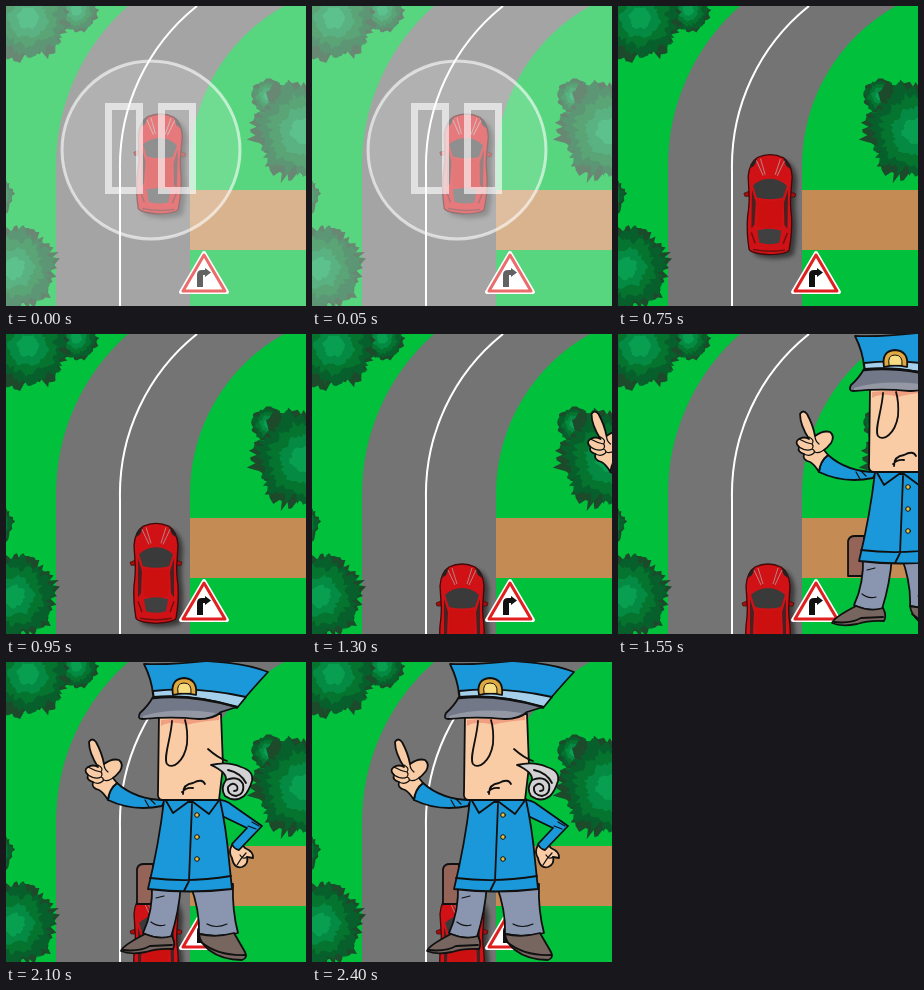
An HTML page for the animation above (2.45 s loop, 300 px wide and 300 px high).

```html
<!DOCTYPE html>
<html lang="en">
<head>
<meta charset="utf-8">
<title>Reversing car and officer</title>
<style>
  html, body { margin: 0; width: 100%; height: 100%; overflow: hidden; background: #00c03c; }
  svg { display: block; width: 100vw; height: 100vh; }
  #officer { stroke: #101010; stroke-width: 1.8; stroke-linejoin: round; stroke-linecap: round; }
  .blue { fill: #1a98da; }
  .skin { fill: #f9cca6; }
  .grey { fill: #8a96b0; }
  .shoe { fill: #76665f; }
  .line { fill: none; }
  .thin { fill: none; stroke-width: 1.2; }
</style>
</head>
<body>
<svg viewBox="0 0 300 300">
  <defs>
    <filter id="soft" x="-30%" y="-30%" width="160%" height="160%"><feGaussianBlur stdDeviation="2"/></filter>
    <path id="body" d="M-13 3Q0-3 13 3Q21 8 22 22L21 38Q20 48 22 62Q23 78 20 95Q18 99 0 100Q-18 99-20 95Q-23 78-22 62Q-20 48-21 38L-22 22Q-21 8-13 3Z"/>
  </defs>

  <rect width="300" height="300" fill="#00c03c"/>
  <path d="M50 300V160A214 214 0 0 1 122 0H278A183 183 0 0 0 184 160V300Z" fill="#747474"/>
  <path d="M114 300V165A205 205 0 0 1 191 0" fill="none" stroke="#fff" stroke-width="2"/>
  <rect x="184" y="184" width="116" height="60" fill="#c48c54"/>
  <g id="trees"></g>

  <g id="car">
    <use href="#body" x="5" y="4" fill="#000" opacity=".5" filter="url(#soft)"/>
    <path d="M-21 37L-26 39L-25 42L-20 42ZM21 37L26 39L25 42L20 42Z" fill="#a80c0c" stroke="#301010" stroke-width=".7"/>
    <use href="#body" fill="#d01216" stroke="#400808" stroke-width="1.3"/>
    <path d="M-20 14Q-19 6-13 4L-16 11ZM20 14Q19 6 13 4L16 11Z" fill="#222"/>
    <path d="M-14 6L-7 21M-10 4L-5 20M14 6L7 21M10 4L5 20" fill="none" stroke="#b98080" stroke-width="1"/>
    <path d="M-17 31Q-10 24 0 24Q10 24 17 31L13 43Q0 46-13 43Z" fill="#3a3a3a"/>
    <path d="M-18 35L-14 48L-15 70L-18 74ZM18 35L14 48L15 70L18 74Z" fill="#4a2020"/>
    <path d="M-13 45Q0 48 13 45L12 72Q0 75-12 72Z" fill="#cc1010"/>
    <path d="M-12 76Q0 72 12 76L10 88Q0 91-10 88Z" fill="#404040"/>
    <path d="M-18 78L-14 89M18 78L14 89M-16 95Q0 98 16 95" fill="none" stroke="#701010" stroke-width="1.5"/>
  </g>

  <g stroke-linejoin="round">
    <path d="M198 247L221 286H175Z" fill="#fff" stroke="#fff" stroke-width="4"/>
    <path d="M198 249L219 285H177Z" fill="#fff" stroke="#e02020" stroke-width="3"/>
    <path d="M191 281V269Q191 264 196 264H199V262L205 266.500L199 271V269H197V281Z" fill="#111"/>
  </g>

  <g id="officer">
    <path d="M131 207Q132 202 138 202H147V242H131Z" fill="#946458"/>
    <path class="grey" d="M146 222H175Q173 250 165 275Q150 278 137 271Q147 250 146 222Z"/>
    <path class="grey" d="M184 222H227Q226 248 232 271Q213 276 193 272Q194 248 184 222Z"/>
    <path class="thin" d="M145 260Q151 265 159 263M201 262Q210 267 221 262M150 236L158 234"/>
    <path class="shoe" d="M139 272Q153 278 166 274Q170 282 167 287Q152 286 140 290Q124 293 115 289Q116 284 139 272Z"/>
    <path class="line" d="M117 288Q133 290 144 284L166 283"/>
    <path class="shoe" d="M193 272Q210 276 228 271L239 290Q242 296 236 298Q216 298 203 288Q194 281 193 272Z"/>
    <path class="line" d="M195 280Q212 294 239 293"/>

    <path class="skin" d="M226 183Q235 180 239 186Q248 190 247 196L241 195Q243 202 236 205Q228 207 226 196Q222 190 226 183Z"/>
    <path class="thin" d="M231 203Q235 196 240 191M234 193Q237 198 241 195"/>
    <path class="blue" d="M209 138Q219 137 226 143L256 164L233 188Q228 187 226 182L241 166L214 153Z"/>
    <path class="thin" d="M246 160L253 164M242 164L250 167"/>

    <path class="blue" d="M159 138Q130 138 111 121Q103 127 102 138Q127 150 156 144Z"/>
    <path class="thin" d="M139 138L143 145M144 137L149 142"/>
    <path class="skin" d="M102 138Q97 130 93 128Q85 126 87 120Q80 118 82 113Q77 108 82 105Q87 102 92 105Q83 91 83 80Q86 75 90 80Q96 91 98 102Q106 96 113 98Q118 102 114 109Q110 114 107 116L111 121Q103 127 102 138Z"/>
    <path class="thin" d="M82 105Q89 109 95 110Q98 106 92 103M82 113Q90 118 95 115Q97 112 95 110M87 120Q93 123 97 119Q98 116 95 115M98 102Q98 107 102 110M107 116Q101 120 98 118"/>

    <path class="blue" d="M158 138H214Q220 165 223 198L226 227Q184 232 142 227Q153 182 158 138Z"/>
    <path class="line" d="M144 216Q184 221 225 214M186 142L183 219L178 229"/>
    <path class="blue" d="M159 137L167 151L182 140L187 140L203 152L214 137Z"/>
    <g fill="#e8c040" stroke-width="1">
      <circle cx="191" cy="153" r="2.300"/><circle cx="191" cy="175" r="2.300"/><circle cx="191" cy="197" r="2.300"/>
    </g>

    <path class="skin" d="M153 52H215L217 104L213 138H156Q151 137 152 130Z"/>
    <path d="M155 58L213 53V58Q190 60 181 63Q165 58 155 64Z" fill="#f0a080" stroke="none"/>
    <path class="line" d="M166 59C165 76 157 96 161 102C166 108 178 100 181 82Q182 68 179 58"/>
    <path class="line" d="M176 130Q180 125 187 126M177 132Q177 122 187 121Q196 116 199 122"/>
    <path class="line" d="M202 87Q212 96 221 99"/>
    <path d="M205 103Q222 99 235 105Q248 109 246 119Q243 129 238 134Q229 141 219 134Q214 126 220 118Q221 110 205 103Z" fill="#d2d2d4"/>
    <path class="line" d="M220 118Q232 113 237 122Q239 132 230 134Q221 133 222 125Q227 119 231 124Q233 129 228 129M222 108Q235 111 240 121"/>

    <path class="blue" d="M138 2Q165 3 200-1Q240 1 262 10Q249 24 231 45L147 33Q146 18 138 2Z"/>
    <path d="M147 29Q190 24 240 35L231 46Q190 34 148 38Z" fill="#a4d0ec"/>
    <path d="M147 35Q185 31 231 45L215 50Q208 57 193 57Q165 54 136 57Q131 57 134 51Q142 44 147 35Z" fill="#727888"/>
    <path d="M137 54Q168 45 210 51Q204 56 193 56Q165 53 137 56Z" fill="#9498a4" stroke="none"/>
    <path class="line" d="M147 36Q185 32 231 45" stroke-width="2.600"/>
    <path d="M167 33Q164 17 178 16Q192 17 190 33Q178 30 167 33Z" fill="#e0a840"/>
    <path d="M172 31Q170 21 178 21Q186 21 185 31Z" fill="#f8dc80" stroke-width="1"/>
  </g>

  <g id="pause">
    <rect width="300" height="300" fill="#fff" opacity=".34"/>
    <circle cx="145" cy="144" r="89" fill="#fff" fill-opacity=".14" stroke="#fff" stroke-opacity=".6" stroke-width="3"/>
    <path d="M102.500 100.500H133.500V184.500H102.500ZM155.500 100.500H186.500V184.500H155.500Z" fill="none" stroke="#fff" stroke-opacity=".62" stroke-width="7"/>
  </g>
</svg>
<script>
const LOOP = 2450, STEP = 50;
const PLAY = 550;   // the pause sign holds until here, then the car sets off
const PARKED = 1150, ARRIVED = 1804;
const get = id => document.getElementById(id);
const progress = (t, from, to) => Math.max(0, Math.min(1, (t - from) / (to - from)));

let seed = 7;
const rand = () => (seed = (seed * 16807) % 2147483647) / 2147483647;

// Leafy blob: a wobbly circle with ragged teeth
function blob(x, y, r, color) {
  const n = Math.round(20 + r * 1.6), phase = rand() * 6;
  const points = Array.from({ length: n }, (_, i) => {
    const a = i / n * 2 * Math.PI;
    const d = r * (0.92 + 0.06 * Math.sin(6 * a + phase) + 0.22 * (rand() - 0.5));
    return `${(x + d * Math.cos(a)).toFixed(1)},${(y + d * Math.sin(a)).toFixed(1)}`;
  });
  return `<polygon points="${points.join(' ')}" fill="${color}"/>`;
}

const leaves = [[1, '#1c4a2a'], [0.9, '#07602c'], [0.7, '#04742f'], [0.48, '#048a42'], [0.26, '#08a050']];
const trees = [[70, 4, 23], [22, 12, 44], [262, 90, 18], [297, 125, 53], [8, 262, 45], [-12, 190, 21]];
get('trees').innerHTML = trees.map(([x, y, r]) =>
  leaves.map(([k, color]) => blob(x, y, r * k, color)).join('')).join('');

function draw(now) {
  const t = Math.floor(now % LOOP / STEP) * STEP;
  const back = progress(t, PLAY, PARKED);
  const turn = Math.min(1, back * 1.5);
  get('car').setAttribute('transform',
    `translate(${155 - 5 * turn} ${108 + 122 * back}) rotate(${1.7 * (1 - turn)})`);
  get('officer').setAttribute('transform', `translate(${255 * (1 - progress(t, PARKED, ARRIVED))} 0)`);
  get('pause').style.display = t < PLAY ? '' : 'none';
}

const start = performance.now();
function tick() {
  draw(performance.now() - start);
  requestAnimationFrame(tick);
}
tick();
</script>
</body>
</html>
```
